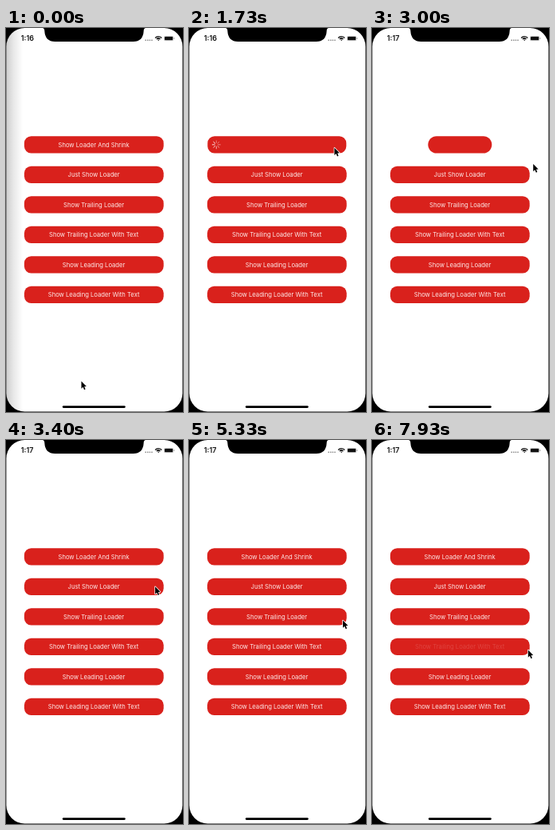
Animation, 222 px wide and 480 px high, one loop 8 s. Source, as an HTML page with a canvas:

```html
<!DOCTYPE html>
<html lang="en">
<head>
<meta charset="utf-8">
<title>Loader buttons</title>
<style>
  html, body { margin: 0; width: 100%; height: 100%; overflow: hidden; background: #000; }
  canvas { display: block; width: 222px; height: 480px; }
</style>
</head>
<body>
<canvas id="stage"></canvas>
<script>
const W = 222, H = 480, LOOP = 8000;
const RED = '#d9211c', INK = '#111', GREY = '#909090';
const LEFT = 22.9, WIDTH = 174.8, BTN_H = 21.3, FIRST_Y = 135.2, PITCH = 37.5;
const CENTER = LEFT + WIDTH / 2;
const LOAD = 1400, FADE = 110, RESIZE = 380, MOVE = 500;

const buttons = [
  { label: 'Show Loader And Shrink', tap: 1435, loader: 'shrink' },
  { label: 'Just Show Loader', tap: 3870, loader: 'center' },
  { label: 'Show Trailing Loader', tap: 5930, loader: 'trailing' },
  { label: 'Show Trailing Loader With Text', tap: 7840, loader: 'trailing' },
  { label: 'Show Leading Loader' },
  { label: 'Show Leading Loader With Text' }
];

// The pointer rests, then glides to each next place
const pointerStart = { x: 94.5, y: 441.5 };
const pointerMoves = [
  { at: 200, x: 164, y: 141 },
  { at: 1220, x: 182.4, y: 149.8 },
  { at: 1800, x: 202.2, y: 170 },
  { at: 3050, x: 183, y: 187 },
  { at: 3905, x: 193, y: 225.5 },
  { at: 6050, x: 195.8, y: 262.5 }
];

const canvas = document.getElementById('stage');
const ctx = canvas.getContext('2d');
const ratio = window.devicePixelRatio || 1;
canvas.width = W * ratio;
canvas.height = H * ratio;

const mix = (a, b, p) => a + (b - a) * p;
const ramp = (t, from, length) => Math.max(0, Math.min(1, (t - from) / length));
const ease = (t, from, length) => {
  const p = ramp(t, from, length);
  return p * p * (3 - 2 * p);
};

function fillBox(x, y, w, h, r, color) {
  ctx.beginPath();
  ctx.roundRect(x, y, w, h, r);
  ctx.fillStyle = color;
  ctx.fill();
}

function drawText(text, x, y, font, color, align) {
  ctx.font = font;
  ctx.textAlign = align;
  ctx.fillStyle = color;
  ctx.fillText(text, x, y);
}

const notch = new Path2D('M45.5 0Q48.3 .4 48.3 3.5Q49 17 61.5 17H159.5Q172 17 172.7 3.5Q172.7 .4 175.5 0Z');

function drawScreen(t) {
  ctx.fillStyle = '#000';
  ctx.fillRect(0, 0, W, H);
  fillBox(0.4, 0, 221, 479.4, 23, '#fff');
  if (t < 1270) {
    const shade = ctx.createLinearGradient(0, 0, 21, 0);
    shade.addColorStop(0, 'rgba(0,0,0,0.2)');
    shade.addColorStop(0.45, 'rgba(0,0,0,0.09)');
    shade.addColorStop(1, 'rgba(0,0,0,0)');
    ctx.fillStyle = shade;
    ctx.fill();
  }
  ctx.fillStyle = '#000';
  ctx.fill(notch);
  fillBox(70.8, 472.2, 79, 2.7, 1.35, '#000');
}

function drawStatus(t) {
  drawText(t < 1900 ? '1:16' : '1:17', 18.8, 16.2, '600 9px Inter, sans-serif', INK, 'left');
  for (let i = 0; i < 4; i++) fillBox(174.4 + i * 2.6, 14.5, 1.6, 1.5, 0.3, GREY);

  ctx.strokeStyle = INK;
  ctx.lineWidth = 1.4;
  ctx.lineCap = 'butt';
  for (const r of [0.8, 3, 5.4]) {
    ctx.beginPath();
    ctx.arc(191.2, 16, r, -Math.PI * 0.77, -Math.PI * 0.23);
    ctx.stroke();
  }

  fillBox(198.1, 9.9, 12, 6.2, 1.8, GREY);
  fillBox(198.5, 10.3, 11.2, 5.4, 1.4, '#fff');
  fillBox(199, 10.8, 10.2, 4.4, 1, INK);
  fillBox(210.5, 12.1, 0.8, 1.8, 0.3, GREY);
}

function drawSpinner(x, y, t) {
  const spokes = 8;
  const head = Math.floor(t / 1000 * spokes);
  ctx.strokeStyle = '#fff';
  ctx.lineWidth = 1;
  ctx.lineCap = 'round';
  for (let age = 0; age < spokes; age++) {
    const a = (head - age) * 2 * Math.PI / spokes;
    ctx.globalAlpha = Math.max(0.4, 0.95 - age * 0.1);
    ctx.beginPath();
    ctx.moveTo(x + Math.cos(a) * 2.2, y + Math.sin(a) * 2.2);
    ctx.lineTo(x + Math.cos(a) * 5, y + Math.sin(a) * 5);
    ctx.stroke();
  }
  ctx.globalAlpha = 1;
}

function labelAlpha({ tap, loader }, t) {
  if (!loader) return 1;
  const back = tap + (loader === 'trailing' ? FADE : LOAD);
  const wait = loader === 'shrink' ? RESIZE : 0;
  return 1 - ramp(t, tap, FADE) + ramp(t, back + wait, FADE / 2);
}

function drawButton(button, i, t) {
  const { label, tap, loader } = button;
  const end = tap + LOAD;
  const shrink = loader === 'shrink'
    ? ease(t, tap + 280, RESIZE) - ease(t, end + 6, RESIZE) : 0;
  const w = mix(WIDTH, BTN_H, shrink);
  const x = CENTER - w / 2;
  const y = FIRST_Y + i * PITCH;
  const mid = y + BTN_H / 2;
  fillBox(x, y, w, BTN_H, mix(8.7, BTN_H / 2, Math.min(1, shrink * 2)), RED);

  ctx.globalAlpha = labelAlpha(button, t);
  drawText(label, CENTER - 0.2, mid + 2.8, '400 7.65px Inter, sans-serif', '#fdeae9', 'center');
  ctx.globalAlpha = 1;

  if (loader && t > tap + FADE && t < end) {
    const spinnerX = { shrink: x + 11, center: CENTER, trailing: x + w - 13.7 };
    drawSpinner(spinnerX[loader], mid, t);
  }
}

const arrow = new Path2D('M0 0V9.2L2.1 7.3L3.6 10.7L5.1 10L3.7 6.8L6.4 6.5Z');

function drawPointer(t) {
  let { x, y } = pointerStart;
  for (const move of pointerMoves) {
    const p = ease(t, move.at, MOVE);
    x = mix(x, move.x, p);
    y = mix(y, move.y, p);
  }
  ctx.save();
  ctx.translate(x, y);
  ctx.lineJoin = 'round';
  ctx.strokeStyle = '#fff';
  ctx.lineWidth = 1.5;
  ctx.stroke(arrow);
  ctx.fillStyle = '#000';
  ctx.fill(arrow);
  ctx.restore();
}

function render(t) {
  ctx.setTransform(ratio, 0, 0, ratio, 0, 0);
  drawScreen(t);
  drawStatus(t);
  buttons.forEach((button, i) => drawButton(button, i, t));
  drawPointer(t);
}

const start = performance.now();
function tick() {
  render((performance.now() - start) % LOOP);
  requestAnimationFrame(tick);
}
tick();
</script>
</body>
</html>
```
